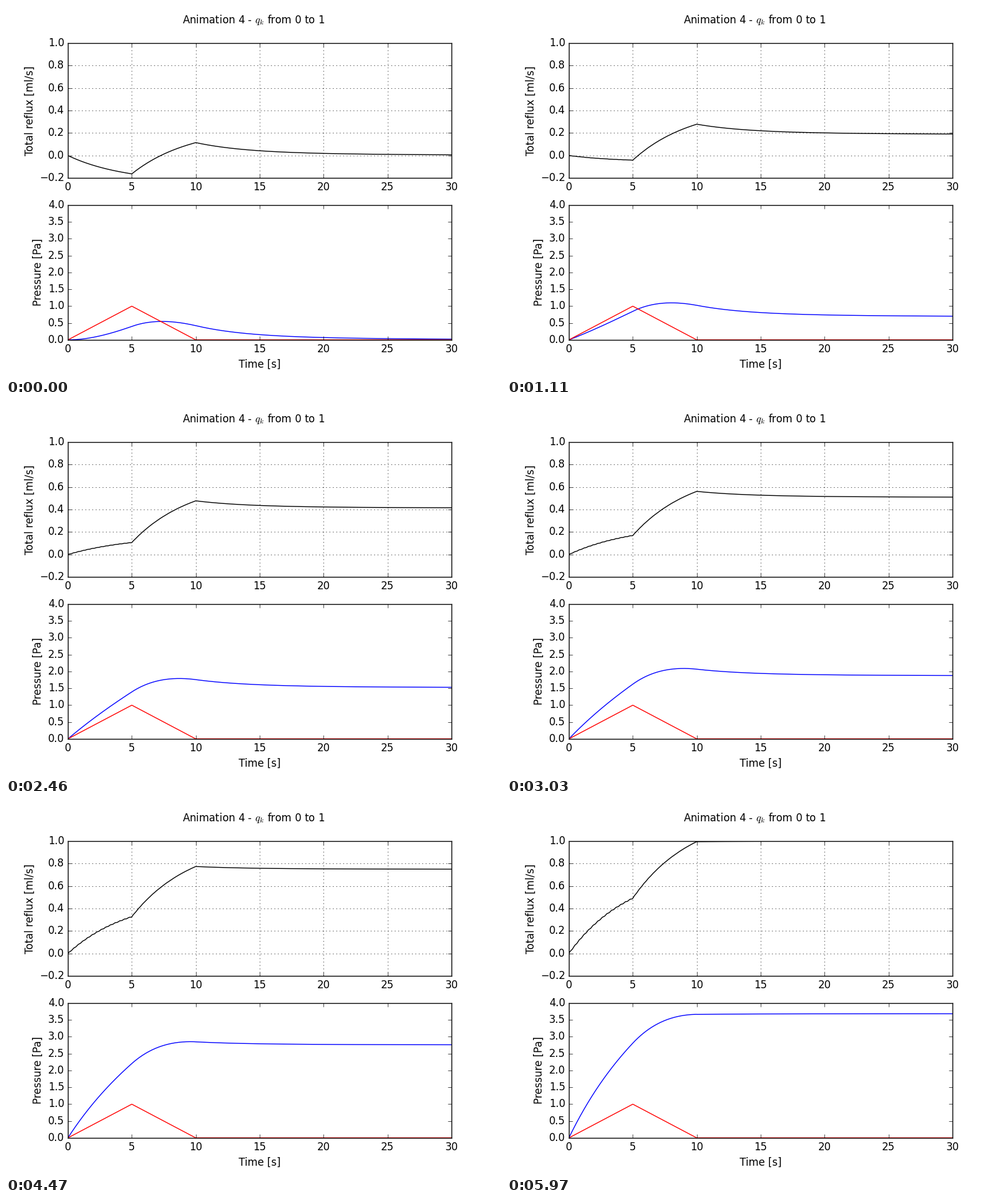
A matplotlib script that plays this animation: 800 by 600 pixels, repeating every 6 s.

```python
import numpy as np
import matplotlib.pyplot as plt
from matplotlib.animation import FuncAnimation

plt.style.use("classic")
plt.rcParams.update({
    "font.family": "DejaVu Sans",
    "figure.facecolor": "white",
    "figure.dpi": 100,
    "savefig.dpi": 100,
})

FRAMES, INTERVAL = 200, 30
RESISTANCE = 3.68

t = np.linspace(0, 30, 601)
phases = [t < 5, t < 10]


def tail(fast):
    """Two-rate decay after the pressure pulse has ended."""
    u = t - 10
    return fast * np.exp(-u / 4) + 0.022 * np.exp(-u / 15)


# External pressure: a triangular pulse
external = np.clip(1 - np.abs(t - 5) / 5, 0, None)

# Reflux caused by the pulse alone
pulse_flow = np.select(phases, [
    -0.2408 * (1 - np.exp(-t / 4.43)),
    -0.163 + 0.419 * (1 - np.exp(-(t - 5) / 4.6)),
], tail(0.093))

# Reflux per unit of constant inflow
step_flow = 1 - np.select(phases, [np.exp(-t / 4.7)] * 2, tail(0.098))

# Small numerical ripple in the reflux reading
ripple = np.select(phases, [
    0.003 * np.sin(2 * np.pi * t / 0.36),
    0.002 * np.sin(2 * np.pi * t / 0.36) * np.exp(-(t - 5) / 1.5),
], 0.0)

fig, (top, bottom) = plt.subplots(2, 1, figsize=(8, 6), dpi=100)
fig.suptitle("Animation 4 - $q_k$ from 0 to 1")

top.set(xlim=(0, 30), ylim=(-0.2, 1.0), ylabel="Total reflux [ml/s]")
top.grid(True)
bottom.set(xlim=(0, 30), ylim=(0, 4), xlabel="Time [s]",
           ylabel="Pressure [Pa]")

flow_line, = top.plot([], [], "k")
pressure_line, = bottom.plot([], [], "b")
bottom.plot(t, external, "r")


def update(i):
    q = i / (FRAMES - 1)
    flow = pulse_flow + q * step_flow
    flow_line.set_data(t, flow + q * ripple)
    pressure_line.set_data(t, RESISTANCE * flow + external)
    return flow_line, pressure_line


anim = FuncAnimation(fig, update, frames=FRAMES, interval=INTERVAL,
                     repeat=True, repeat_delay=0)
plt.show()
```
